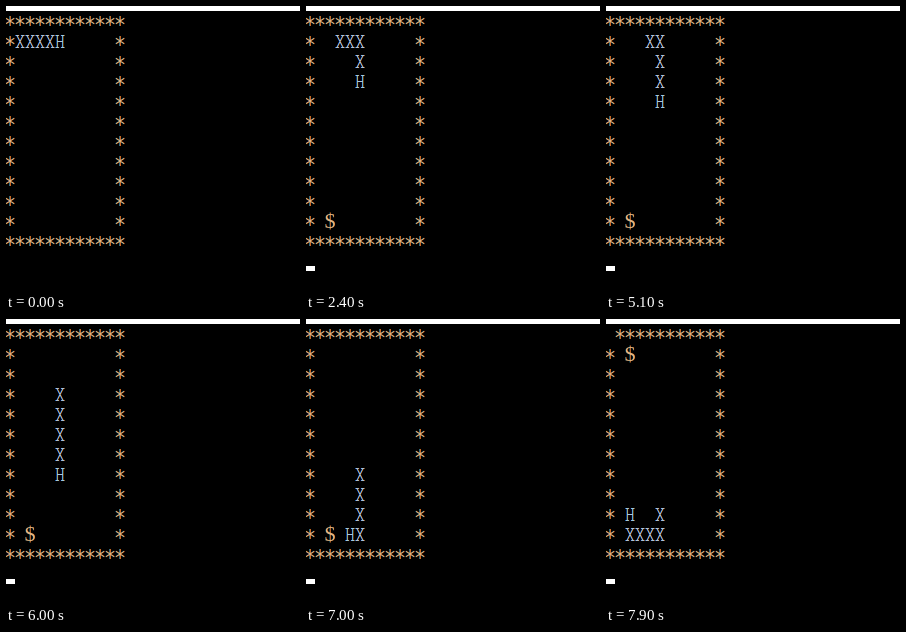
Animation, 294 px wide and 285 px high, one loop 8000 ms. Source, as an HTML page with a canvas:

```html
<!DOCTYPE html>
<html lang="en">
<head>
<meta charset="utf-8">
<title>Console snake</title>
<style>
html, body { margin: 0; width: 100%; height: 100%; overflow: hidden; background: #000; }
canvas { display: block; }
</style>
</head>
<body>
<canvas id="stage" width="294" height="285"></canvas>
<script>
const ctx = document.getElementById('stage').getContext('2d');
const LOOP = 8000, COLS = 12, ROWS = 12, CELL_W = 10, CELL_H = 20, TOP = 5;

const SERIFS = 'M.5 4.5h3.5M6 4.5h3.5M.5 16.5h3.5M6 16.5h3.5';
const SHAPES = {
  '*': new Path2D('M5 5v10M.8 7.3L9.2 12.7M9.2 7.3L.8 12.7'),
  X: new Path2D(SERIFS + 'M2 4.5L8 16.5M8 4.5L2 16.5'),
  H: new Path2D(SERIFS + 'M2.3 4.5v12M7.7 4.5v12M2.3 10.5h5.4')
};
const TINTS = { '*': [222, 180, 132], X: [176, 190, 215], H: [165, 198, 222], $: [226, 180, 128] };

// Cells visited by the head, in order.
const path = [];
for (let x = 1; x <= 5; x++) path.push([x, 1]);
for (let y = 2; y <= 10; y++) path.push([5, y]);
for (let x = 4; x >= 2; x--) path.push([x, 10]);
path.push([2, 9]);

const START = 4, EATEN = 7600;
const moves = [2400, 5100, 5600, 5800, 6000, 6200, 6400, 6700, 7000, 7300, EATEN, 7900];
const between = (t, from, to) => t >= from && t < to;

// Each colour channel is offset by a third of a pixel, as on an LCD.
function drawGlyph(char, col, row) {
  ctx.save();
  ctx.globalCompositeOperation = 'lighter';
  ctx.translate(col * CELL_W - 1, TOP + row * CELL_H);
  ctx.lineWidth = 1.15;
  ctx.font = '22px "Liberation Serif", serif';
  ctx.textAlign = 'center';
  TINTS[char].forEach((level, channel) => {
    const rgb = [0, 0, 0];
    rgb[channel] = level;
    ctx.fillStyle = ctx.strokeStyle = `rgb(${rgb})`;
    ctx.save();
    ctx.translate((1 - channel) / 3, 0);
    if (SHAPES[char]) ctx.stroke(SHAPES[char]);
    else ctx.fillText(char, 5, 17);
    ctx.restore();
  });
  ctx.restore();
}

function drawBorder(t) {
  for (let row = 0; row < ROWS; row++) {
    for (let col = 0; col < COLS; col++) {
      const edge = row % (ROWS - 1) === 0 || col % (COLS - 1) === 0;
      const pending = t >= 7900 && row + col === 0;
      if (edge && !pending) drawGlyph('*', col, row);
    }
  }
}

function drawSnake(t) {
  const steps = moves.filter(time => t >= time).length;
  const head = START + steps + (steps ? 1 : 0); // the first entry makes two steps
  const length = t >= 7900 ? 6 : 5;
  for (let i = head - length + 1; i <= head; i++) {
    drawGlyph(i === head ? 'H' : 'X', ...path[i]);
  }
}

function drawTyped(col) {
  const x = col * CELL_W - 1, y = TOP + ROWS * CELL_H;
  ctx.fillStyle = '#c0c0c0';
  ctx.fillRect(x, y, CELL_W, CELL_H);
  ctx.fillStyle = '#000';
  ctx.font = '20px "Liberation Serif", serif';
  ctx.textAlign = 'center';
  ctx.fillText('s', x + 5, y + 17);
}

function render(t) {
  ctx.fillStyle = '#000';
  ctx.fillRect(0, 0, 294, 285);
  ctx.fillStyle = '#fff';
  ctx.fillRect(0, 0, 294, TOP);

  const cursorOn = t >= 2400 && !between(t, 3300, 3800) && !between(t, 4200, 4700);
  if (cursorOn) ctx.fillRect(0, 260, 9, 5);
  if (between(t, 1300, 2400)) drawTyped(0);
  if (between(t, 1700, 2400)) drawTyped(1);

  const cleared = between(t, 6100, 6200) || between(t, 7200, 7300);
  if (cleared) return;
  drawBorder(t);
  drawSnake(t);
  if (t >= 2400) drawGlyph('$', 2, t < EATEN ? 10 : 1);
}

function tick() {
  render(performance.now() % LOOP);
  requestAnimationFrame(tick);
}
tick();
</script>
</body>
</html>
```
